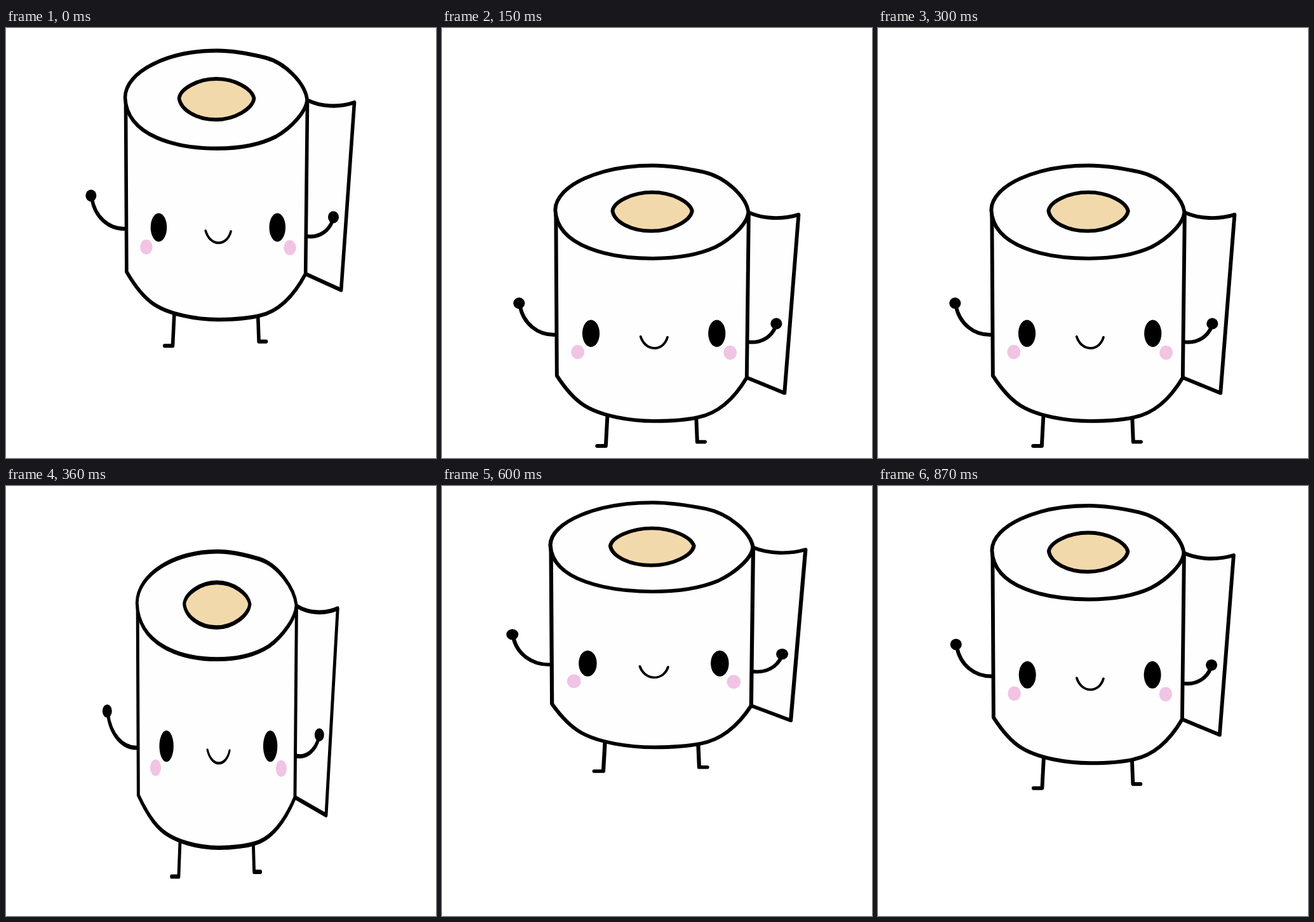
Animation of 677 by 677 pixels, one loop 0.9 s. Source, as an HTML page:

```html
<!DOCTYPE html>
<html lang="en">
<head>
<meta charset="utf-8">
<title>Bouncing roll</title>
<style>
  html, body { margin: 0; width: 100%; height: 100%; overflow: hidden; background: #fff; }
  svg { display: block; width: 100vw; height: 100vh; }
  .ink { fill: none; stroke: #000; stroke-width: 5.9; stroke-linecap: round; stroke-linejoin: round; }
  .paper { fill: #fefefe; }
  .core { fill: #f1d9ac; }
  .smile { stroke-width: 3.8; }
  .cheek { fill: #f0c4e2; }
</style>
</head>
<body>
<svg viewBox="0 0 677 677">
  <g id="roll">
    <path class="ink paper" d="M482 105C505 115.500 535 116.500 560 108.500L538 391.500L479 367"/>
    <path class="ink" d="M261 428L258.500 475.500H245"/>
    <path class="ink" d="M400 431L401.500 469H413.500"/>
    <path class="ink" d="M124 252C129 281 152 300.500 181 299"/>
    <path class="ink paper" d="M180.500 104L182 364C196 386 210 402 226 412C252 428 296 436 335 436C363 436 390 433 403 430C438 423 462 396 479 367L482 106"/>
    <path class="ink" d="M482 310.500C502 313 518 302 524 286"/>
    <path class="ink paper" d="M179.500 101C180 62 250 30.500 332 30.500C360 30.500 385 35 412 41C446 49 478 80 481.500 104C481 122 455 147 430 160C400 174 365 178 332 178C266 178 182 160 179.500 101Z"/>
    <path class="ink core" d="M269 102.500C271 88 300 73 331 73C362 73 390 88 393.500 102.500C391 118 362 134.500 330 134.500C298 134.500 272 120 269 102.500Z"/>
    <ellipse cx="235.300" cy="297" rx="13.500" ry="21.500"/>
    <ellipse cx="432.200" cy="297" rx="13.500" ry="21.500"/>
    <ellipse class="cheek" cx="214.700" cy="326.500" rx="10.300" ry="11.300"/>
    <ellipse class="cheek" cx="453" cy="327.500" rx="10.300" ry="11.300"/>
    <path class="ink smile" d="M313 302C316.500 313 324.500 320.300 334.500 320.300C345.500 320.300 352.500 312 355 303"/>
    <circle cx="122.900" cy="249" r="9"/>
    <circle cx="525.200" cy="281.500" r="9"/>
  </g>
</svg>
<script>
const roll = document.getElementById("roll");
const STEP = 30, STEPS = 30, LAST = 14, POWER = 4.2;
const REST = { left: 338, top: 27, width: 448, height: 452 };

// Values on the ground, mid-air, near the top and at the top; slope is the mid-air speed.
const TOP = { ground: 291, air: 99, high: 32, peak: 22.7, slope: -36 };
const BOTTOM = { ground: 666, air: 619, high: 504, peak: 452, slope: -38 };
const WIDTH = { ground: 533, air: 372, high: 425, peak: 473.3, slope: 3 };

function hermite(a, b, va, vb, span, t) {
  const t2 = t * t, t3 = t2 * t;
  return a * (2 * t3 - 3 * t2 + 1) + b * (3 * t2 - 2 * t3)
    + span * (va * (t3 - 2 * t2 + t) + vb * (t3 - t2));
}

// s counts steps away from the ground pose, 0 to LAST
function valueAt(c, s) {
  const rest = c.high - c.peak;
  if (s <= 4) return hermite(c.ground, c.air, 0, c.slope, 4, s / 4);
  if (s <= 7) return hermite(c.air, c.high, c.slope, -rest * POWER / 7, 3, (s - 4) / 3);
  return c.peak + rest * Math.pow((LAST - s) / 7, POWER);
}

function draw(ms) {
  const k = Math.floor(ms / STEP) % STEPS;
  const d = Math.abs(k - 7.5);
  const s = Math.min(d, STEPS - d) - 0.5;
  const top = valueAt(TOP, s);
  const sx = valueAt(WIDTH, s) / REST.width;
  const sy = (valueAt(BOTTOM, s) - top) / REST.height;
  const x = 337.9 - REST.left * sx;
  const y = top - REST.top * sy;
  roll.setAttribute("transform", `matrix(${sx} 0 0 ${sy} ${x} ${y})`);
}

let start = null;
function tick(now) {
  if (start === null) start = now;
  draw(now - start);
  requestAnimationFrame(tick);
}
draw(0);
requestAnimationFrame(tick);
</script>
</body>
</html>
```
